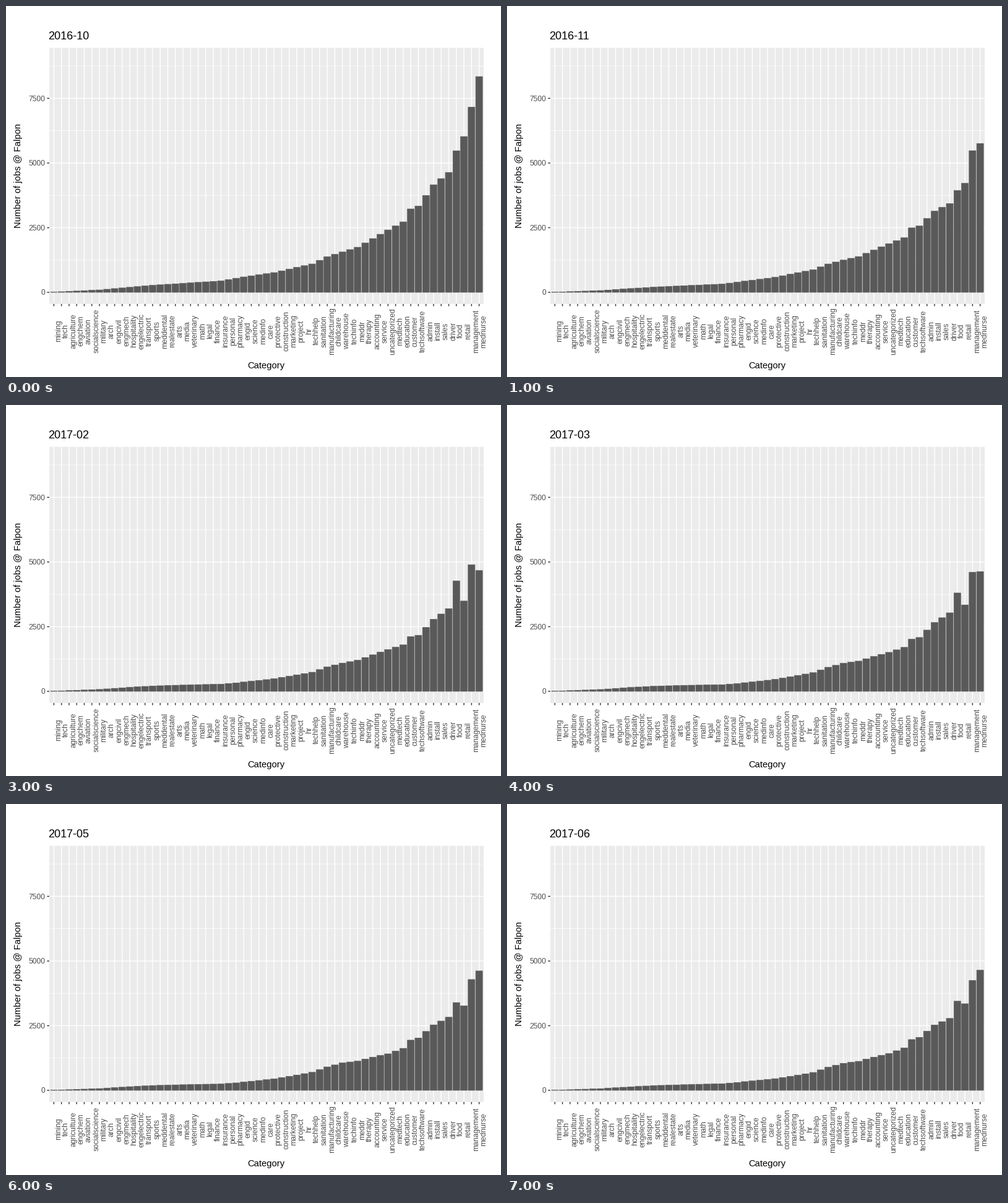
Animation of 800x600 px, one loop 8 s. Source, as a matplotlib script:

```python
import numpy as np
import matplotlib
import matplotlib.pyplot as plt
from matplotlib.animation import FuncAnimation
from matplotlib.patches import Rectangle

matplotlib.rcParams["font.family"] = "Liberation Sans"
matplotlib.rcParams["path.snap"] = False

W, H = 800, 600
PT = 0.72  # points per pixel at 100 dpi
LEFT, RIGHT, TOP, BOTTOM = 70, 772, 67.7, 481.8
ZERO, PER_JOB = 463.1, 0.041833
TICK = 3.67
BAR, DARK, AXIS_TEXT = "#595959", "#333333", "#4D4D4D"

LABELS = """mining tech agriculture engchem aviation socialscience military arch
engcivil engmech hospitality engelectric transport sports meddental realestate
arts media veterinary math legal finance insurance personal pharmacy engid
science medinfo care protective construction marketing project hr techhelp
sanitation manufacturing childcare warehouse techinfo meddr therapy accounting
service uncategorized medtech education customer techsoftware admin install
sales driver food retail management mednurse""".split()
COUNT = len(LABELS)
STEP = (RIGHT - LEFT) / (COUNT + 0.2)
INDEX = np.arange(COUNT)
CENTERS = LEFT + STEP * (0.6 + INDEX)

# Key points of the first month's curve: bar, height in pixels
CURVE = [(0, 0.5), (6, 4), (13, 11.5), (22, 18.6), (25, 25), (29, 32),
         (34, 46), (36, 57.7), (40, 73), (44, 101), (46, 114), (47, 135),
         (48, 139.5), (50, 174), (52, 194), (53, 229), (54, 252),
         (55, 299.5), (56, 349)]
FIRST = np.interp(INDEX, *zip(*CURVE))

# Each later month scales that curve, by a ratio that drifts between these bars
KEY_BARS = [10, 24, 32, 38, 44, 48, 52, 53, 54, 55, 56]


def scaled(*ratios):
    return FIRST * np.interp(INDEX, KEY_BARS, ratios)


nov = scaled(.75, .72, .79, .80, .78, .77, .74, .72, .70, .765, .69)
jan = scaled(.85, .80, .85, .86, .81, .80, .91, .80, .76, .78, .794)
feb = scaled(.80, .60, .66, .70, .67, .65, .69, .78, .58, .684, .56)
apr = scaled(.75, .50, .62, .69, .58, .60, .62, .61, .53, .603, .55)
jun = scaled(.70, .56, .61, .67, .59, .615, .60, .63, .556, .594, .557)

MONTHS = [("2016-10", FIRST), ("2016-11", nov), ("2017-01", jan),
          ("2017-02", feb), ("2017-03", (feb + apr) / 2), ("2017-04", apr),
          ("2017-05", (apr + jun) / 2), ("2017-06", jun)]

fig = plt.figure(figsize=(W / 100, H / 100), dpi=100, facecolor="white")
ax = fig.add_axes([0, 0, 1, 1])
ax.set_xlim(0, W)
ax.set_ylim(H, 0)
ax.axis("off")


def line(x0, y0, x1, y1, color="white", width=1.42, z=1):
    ax.plot([x0, x1], [y0, y1], color=color, lw=width * PT, zorder=z,
            solid_capstyle="butt")


def text(x, y, s, size, color="black", ha="center", rotation=0):
    return ax.text(x, y, s, fontsize=size * PT, color=color, ha=ha,
                   va="baseline", rotation=rotation, rotation_mode="anchor")


ax.add_patch(Rectangle((LEFT, TOP), RIGHT - LEFT, BOTTOM - TOP,
                       fc="#EBEBEB", lw=0, zorder=0))
for jobs in range(1250, 9000, 2500):
    y = ZERO - jobs * PER_JOB
    line(LEFT, y, RIGHT, y, width=0.71)
for jobs in range(0, 7501, 2500):
    y = ZERO - jobs * PER_JOB
    line(LEFT, y, RIGHT, y)
    line(LEFT - TICK, y, LEFT, y, DARK)
    text(63.2, y + 4.3, str(jobs), 12, AXIS_TEXT, "right")
for x, label in zip(CENTERS, LABELS):
    line(x, TOP, x, BOTTOM)
    line(x, BOTTOM, x, BOTTOM + TICK, DARK)
    text(x + 10.5, 525.8, label, 12, AXIS_TEXT, rotation=90)

text(420, 586, "Category", 14.8)
text(24, 274.7, "Number of jobs @ Falpon", 14.8, rotation=90)
title = text(68.4, 54, "", 18, ha="left")

# A thin outline narrows the gaps between the bars
bars = [ax.add_patch(Rectangle((x - 0.45 * STEP, ZERO), 0.9 * STEP, 0,
                               fc=BAR, ec=BAR, lw=0.6 * PT, zorder=2))
        for x in CENTERS]


def draw(i):
    date, heights = MONTHS[i]
    title.set_text(date)
    for bar, h in zip(bars, heights):
        bar.set_height(-h)
    return [title, *bars]


anim = FuncAnimation(fig, draw, frames=len(MONTHS), interval=1000,
                     init_func=lambda: draw(0), repeat=True, repeat_delay=0)
plt.show()
```
